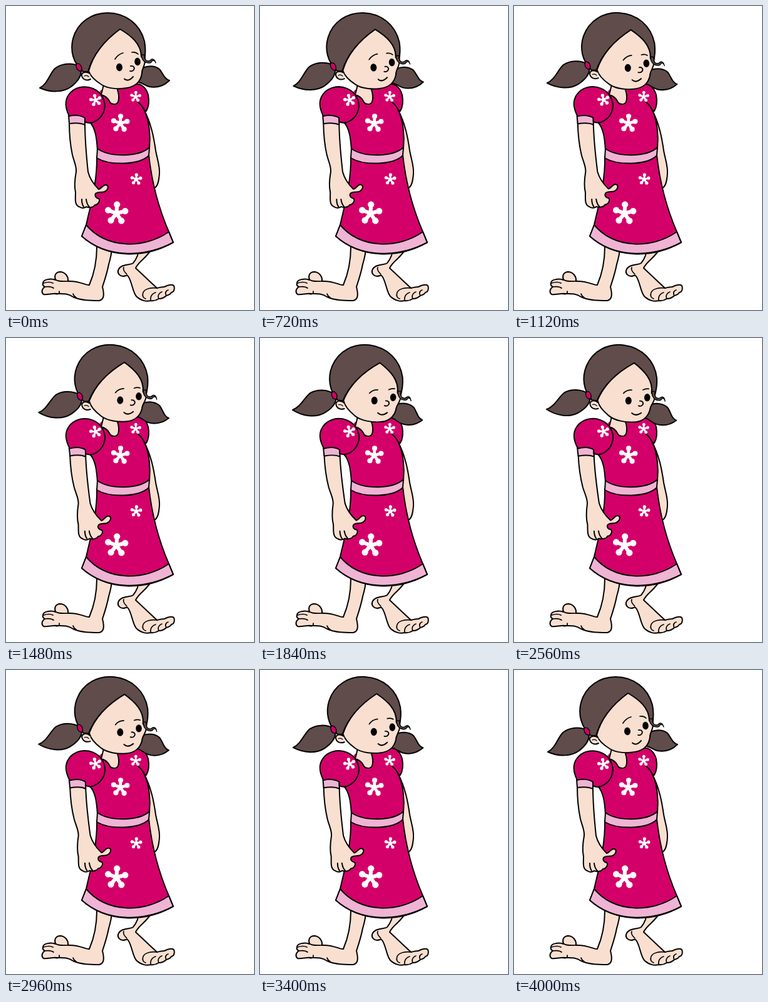
Animation of 396 by 486 pixels, one loop 4.96 s. Source, as an HTML page with a canvas:

```html
<!DOCTYPE html>
<html lang="en">
<head>
<meta charset="utf-8">
<title>Girl tilting her head</title>
<style>
html, body { margin: 0; width: 100%; height: 100%; overflow: hidden; background: #fff; }
canvas { display: block; }
</style>
</head>
<body>
<canvas id="stage" width="396" height="486"></canvas>
<script>
const ctx = document.getElementById('stage').getContext('2d');
const LOOP = 4960, START = 480, STEP = 40, RISE = 45, STEPS = 89;
const SKIN = '#f9dfd0', RED = '#d4006a', PINK = '#efb4d4', HAIR = '#5f4c4b', INK = '#000';

const path = d => new Path2D(d);
const mix = (a, b, p) => a + (b - a) * p;

const shape = {
  legL: path('M145 385 C145 405 142 425 133 446 C127 447 118 439 99 440 C100 432 94 425 86 425 C78 426 77 432 79 438 C72 435 59 437 59 443 C58 446 60 448 62 449 C57 452 56 458 60 461 C66 462 75 459 82 460 C91 460 98 459 107 465 C119 471 136 471 149 471 C157 469 157 461 154 449 C157 440 162 424 164 413 C167 403 169 395 169 385 Z'),
  toesL: path('M79 437 C82 441 91 440 99 440 M62 449 C68 448 72 448 76 451 M78 460 C83 462 86 459 85 456 M60 443 C66 441 71 441 75 443 M107 460 C108 463 110 465 112 466'),
  legR: path('M213 385 C212 395 209 404 203 411 C197 415 182 412 179 423 C178 428 182 432 187 432 C191 432 193 429 195 432 C201 440 202 457 208 464 C215 471 224 473 231 471 C237 472 241 470 244 468 C249 468 253 466 256 463 C260 462 263 460 264 458 C270 457 270 447 266 446 C261 445 257 447 253 449 C249 449 245 450 241 451 L207 419 C212 407 227 402 234 385 Z'),
  toesR: path('M241 451 C234 450 222 451 219 458 C217 463 219 467 223 468 M231 470 C230 463 235 459 239 458 M244 468 C241 462 246 458 249 457 M256 463 C253 458 256 455 259 454 M188 418 C186 422 190 426 193 429'),
  armR: path('M220 165 C232 188 236 210 239 231 C241 243 246 256 245 268 C244 281 242 290 236 291 L222 240 Z'),
  sleeveR: path('M203 127 C214 120 224 131 227 142 C229 152 228 161 224 168 L204 158 Z'),
  skirt: path('M145 241 C146 278 136 315 128 350 L121 368 C160 403 220 405 267 378 L260 361 C245 326 233 285 228 238 Z'),
  bodice: path('M152 134 L130 160 L134 186 C143 195 145 213 146 231 C170 244 212 243 229 228 C231 208 229 184 221 167 L210 153 L214 130 L182 126 Z'),
  bodiceLine: path('M134 186 C143 195 145 213 146 231 M229 228 C231 208 229 184 221 167 Q217 158 210 153'),
  belt: path('M146 228 C165 242 212 242 229 226 L228 239 C212 255 165 255 145 243 Z'),
  hem: path('M128 350 C160 388 220 389 260 361 L267 378 C220 403 160 403 121 368 Z'),
  neck: path('M156 124 C155 132 153 137 152 142 C160 144 163 148 165 152 C168 159 177 158 179 153 C181 147 180 140 178 134 L182 127 Z'),
  armL: path('M101 186 C101 206 103 224 106 238 C109 250 113 257 112 265 C110 276 109 289 111 298 C111 308 109 318 117 321 C121 324 126 323 128 321 C133 323 140 322 142 318 C147 318 151 311 148 308 C143 307 141 303 143 300 C147 296 152 299 157 297 C163 294 165 288 160 286 C155 285 153 292 148 293 C140 285 134 277 131 265 C129 246 126 215 126 186 Z'),
  fingers: path('M121 309 Q121 317 124 321 M128 309 Q129 317 133 321'),
  cuff: path('M100 175 C108 173 119 174 126 178 L126 190 C118 186 108 187 101 188 Z'),
  sleeveL: path('M101 176 C95 164 93 152 100 142 C108 130 125 126 139 132 C153 138 160 152 157 166 C153 181 137 191 126 185 L126 179 C119 174 108 174 101 176 Z'),
  tailR: path('M218 99 C227 95 238 95 245 101 C251 108 253 117 261 119 C252 128 240 131 229 129 C221 127 217 122 211 122 Z'),
  face: path('M182 35 C157 55 139 77 132 104 C135 114 145 121 153 126 C164 133 182 133 193 131 C206 129 215 121 217 108 C216 102 222 96 222 87 L220 58 Z'),
  hair: path('M123 105 C107 91 102 71 107 52 C114 26 137 11 162 11 C191 11 214 29 221 56 C223 66 223 76 221 86 L216 81 C216 60 199 47 182 37 C159 54 139 76 131 105 Z'),
  curl: path('M216 78 C217 88 223 92 230 91 C234 90 232 87 235 87 Q238 87 239 91 Q237 84 233 85 C230 86 231 88 227 88 C223 88 221 84 221 78 Z'),
  ear: path('M134 108 C126 103 120 107 121 112 C123 118 129 120 135 117'),
  earLine: path('M125 112 Q129 110 132 113'),
  tailL: path('M117 96 C104 90 88 92 78 100 C70 108 66 125 54 131 C72 139 92 138 104 129 C113 122 120 113 120 104 Z'),
  nose: path('M199 96 C204 95 206 99 204 102 Q202 105 198 104')
};

function line(p, width = 2) {
  ctx.lineWidth = width;
  ctx.strokeStyle = INK;
  ctx.stroke(p);
}

function part(p, fill, width) {
  ctx.fillStyle = fill;
  ctx.fill(p);
  line(p, width);
}

function oval(x, y, rx, ry, turn, fill) {
  ctx.fillStyle = fill;
  ctx.beginPath();
  ctx.ellipse(x, y, rx, ry, turn, 0, Math.PI * 2);
  ctx.fill();
}

// Five round-ended petals
function flower(x, y, r, turn = 0.05) {
  ctx.strokeStyle = '#fff';
  ctx.lineWidth = r * 0.32;
  for (let i = 0; i < 5; i++) {
    const a = turn - Math.PI / 2 + i * Math.PI * 0.4;
    const ex = x + Math.cos(a) * r * 0.75, ey = y + Math.sin(a) * r * 0.75;
    ctx.beginPath();
    ctx.moveTo(x, y);
    ctx.lineTo(ex, ey);
    ctx.stroke();
    oval(ex, ey, r * 0.27, r * 0.27, 0, '#fff');
  }
}

function turned(x, y, angle, draw) {
  ctx.save();
  ctx.translate(x, y);
  ctx.rotate(angle);
  ctx.translate(-x, -y);
  draw();
  ctx.restore();
}

// Quadratic curve blended between two poses
function blend(a, b, p, width) {
  const v = a.map((n, i) => mix(n, b[i], p));
  line(path(`M${v[0]} ${v[1]} Q${v.slice(2).join(' ')}`), width);
}

function body() {
  part(shape.legL, SKIN);
  line(shape.toesL, 1.7);
  part(shape.legR, SKIN);
  line(shape.toesR, 1.7);
  part(shape.armR, SKIN);
  part(shape.sleeveR, RED);
  part(shape.skirt, RED);
  part(shape.hem, PINK);
  ctx.fillStyle = RED;
  ctx.fill(shape.bodice);
  line(shape.bodiceLine);
  part(shape.belt, PINK);
  part(shape.neck, SKIN);
  flower(182.5, 187.5, 15);
  flower(176.5, 331.5, 19);
  flower(208, 277, 9.5);
  flower(207, 145, 9);
}

function arm() {
  part(shape.armL, SKIN);
  line(shape.fingers);
  part(shape.cuff, PINK);
  part(shape.sleeveL, RED);
  flower(143, 150.5, 9.8, -0.2);
}

function head(p) {
  part(shape.tailR, HAIR);
  part(shape.face, SKIN);
  part(shape.hair, HAIR);
  part(shape.curl, HAIR, 1.4);
  part(shape.ear, SKIN);
  line(shape.earLine, 1.2);
  turned(118, 100, 0.03 * p, () => part(shape.tailL, HAIR));
  oval(116.5, 98, 4.6, 7, -0.5, INK);
  oval(116.5, 98, 3.2, 5.6, -0.5, RED);
  oval(181, 98, 5, 6.2, -0.1, INK);
  oval(210, 89, 4.8, 6.2, -0.1, INK);
  line(shape.nose, 1.8);
  blend([174, 85, 179, 77, 187, 75], [171, 88, 175, 82, 183.5, 81.7], p, 1.7);
  blend([201, 74, 207, 73, 211, 77], [201.7, 78.7, 206, 75, 210.5, 74.5], p, 1.7);
  blend([189, 116.5, 195, 122, 203, 113], [189, 117, 196, 122, 204, 115], p, 2);
}

function pose(t) {
  const k = Math.min(STEPS, Math.max(0, Math.floor((t - START) / STEP) + 1));
  return k <= RISE ? k / RISE : (STEPS - k) / (STEPS - RISE);
}

function draw(t) {
  const p = pose(t);
  ctx.fillStyle = '#fff';
  ctx.fillRect(0, 0, 396, 486);
  ctx.lineCap = ctx.lineJoin = 'round';
  body();
  turned(118, 150, -0.053 * p, arm);
  turned(166, 112, 0.166 * p, () => head(p));
}

const begin = performance.now();
function tick() {
  draw((performance.now() - begin) % LOOP);
  requestAnimationFrame(tick);
}
tick();
</script>
</body>
</html>
```
